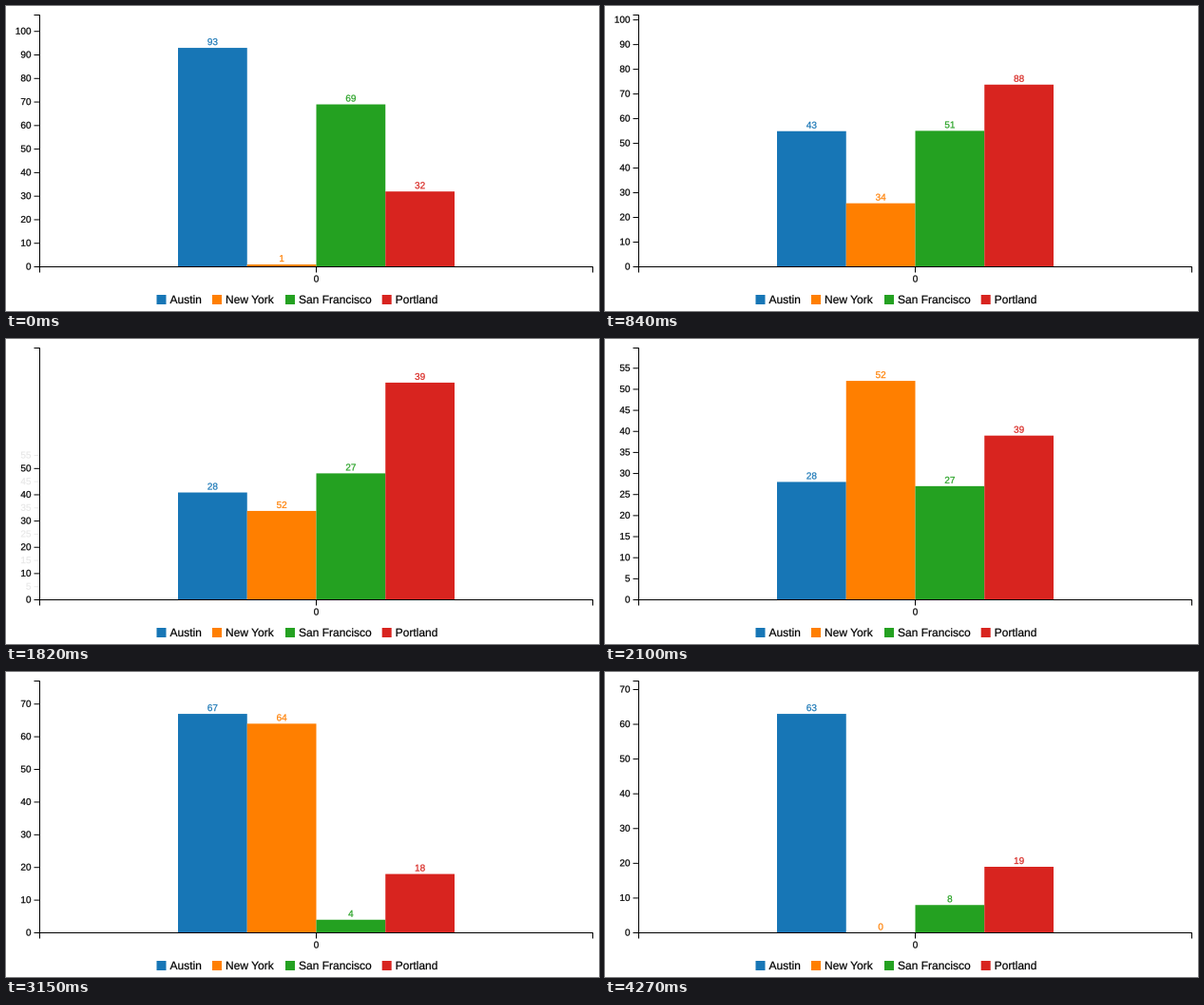
Write a matplotlib script that moves like this. It is 624 px wide and 321 px high and loops after 4830 ms.

```python
import matplotlib.pyplot as plt
from matplotlib.animation import FuncAnimation
from matplotlib.patches import PathPatch, Rectangle
from matplotlib.textpath import TextPath
from matplotlib.transforms import Affine2D

W, H, DPI = 624, 321, 100
STEP, FRAMES = 70, 69
LEFT, RIGHT, TOP, BASE = 35.5, 617.5, 9.5, 274.5
MID = (LEFT + RIGHT) / 2
HEADROOM = 1.15
BAR_W = (RIGHT - LEFT) / 8
DURATION = 350
AXIS_LEAD = 25  # the axis starts moving slightly before the bars

COLORS = ["#1776b6", "#ff7f00", "#24a121", "#d8241f"]
LEGEND = [("Austin", 158.5), ("New York", 217), ("San Francisco", 294), ("Portland", 395.7)]
DATA = [(93, 1, 69, 32), (43, 34, 51, 88), (28, 52, 27, 39), (67, 64, 4, 18), (63, 0, 8, 19)]
TICK_STEPS = [10, 10, 5, 10, 10]
# (time the data changes, delay before the movement)
CHANGES = [(630, 0), (1750, 0), (2800, 0), (3850, 35)]

plt.rcParams["font.family"] = "Liberation Sans"
fig = plt.figure(figsize=(W / DPI, H / DPI), dpi=DPI, facecolor="white")
ax = fig.add_axes([0, 0, 1, 1])
ax.set_xlim(0, W)
ax.set_ylim(H, 0)
ax.axis("off")

ALIGN = {"left": 0, "center": 0.5, "right": 1}
glyphs = {}


def text(x, y, s, size=10, align="left", color="black", alpha=1):
    """Text with its baseline at y, placed at sub-pixel accuracy."""
    if (s, size) not in glyphs:
        advance = TextPath((0, 0), s + "|", size=size).get_extents().x1
        bar = TextPath((0, 0), "|", size=size).get_extents().x1
        glyphs[s, size] = TextPath((0, 0), s, size=size), advance - bar
    path, width = glyphs[s, size]
    place = Affine2D().scale(1, -1).translate(x - ALIGN[align] * width, y)
    return ax.add_patch(PathPatch(path, transform=place + ax.transData, fc=color, ec=color,
                                  lw=0.15, alpha=alpha, zorder=4, snap=False))


def line(xs, ys, alpha=1):
    return ax.plot(xs, ys, color="black", lw=72 / DPI, alpha=alpha, snap=False,
                   solid_capstyle="butt", solid_joinstyle="miter", zorder=3)[0]


def box(x, y, w, h, color):
    return ax.add_patch(Rectangle((x, y), w, h, fc=color, lw=0, snap=False, zorder=2))


def ease(t):
    t = min(max(t, 0), 1)
    return 4 * t ** 3 if t < 0.5 else 1 - 4 * (1 - t) ** 3


def mix(a, b, p):
    return a + (b - a) * p


def unit(n):
    """Pixels per value for data set n."""
    return (BASE - TOP) / (HEADROOM * max(DATA[n]))


def ticks(n):
    return list(range(0, int(HEADROOM * max(DATA[n])) + 1, TICK_STEPS[n]))


def state(ms):
    """Previous set, current set, progress of the bars and of the axis."""
    now = sum(ms >= start for start, _ in CHANGES)
    if now == 0:
        return 0, 0, 1, 1
    start, delay = CHANGES[now - 1]
    run = ms - start - delay
    return now - 1, now, ease(run / DURATION), ease((run + AXIS_LEAD) / DURATION)


def draw_static():
    line([LEFT - 6, LEFT, LEFT, LEFT - 6], [TOP, TOP, BASE, BASE])
    line([LEFT, LEFT, RIGHT, RIGHT], [BASE + 6, BASE, BASE, BASE + 6])
    line([MID, MID], [BASE, BASE + 6])
    text(MID, 290.5, "0", align="center")
    for (name, x), color in zip(LEGEND, COLORS):
        box(x, 304, 10, 10, color)
        text(x + 14, 313, name, size=12)


live = []


def update(i):
    while live:
        live.pop().remove()
    old, new, p, q = state(i * STEP)

    for k, color in enumerate(COLORS):
        x = MID + (k - 2) * BAR_W
        h = mix(DATA[old][k] * unit(old), DATA[new][k] * unit(new), p)
        live.append(box(x, BASE - h, BAR_W, h, color))
        live.append(text(x + BAR_W / 2, BASE - h - 3, str(DATA[new][k]),
                         align="center", color=color))

    scale = mix(unit(old), unit(new), q)
    kept = ticks(old)
    for v in ticks(new):
        y = BASE - v * scale
        alpha = 1 if v in kept else q
        live.append(text(LEFT - 9, y + 3, str(v), align="right", alpha=alpha))
        if v:
            live.append(line([LEFT - 6, LEFT], [y, y], alpha))
    return live


draw_static()
anim = FuncAnimation(fig, update, frames=FRAMES, interval=STEP, repeat=True,
                     repeat_delay=0, blit=False)
plt.show()
```
